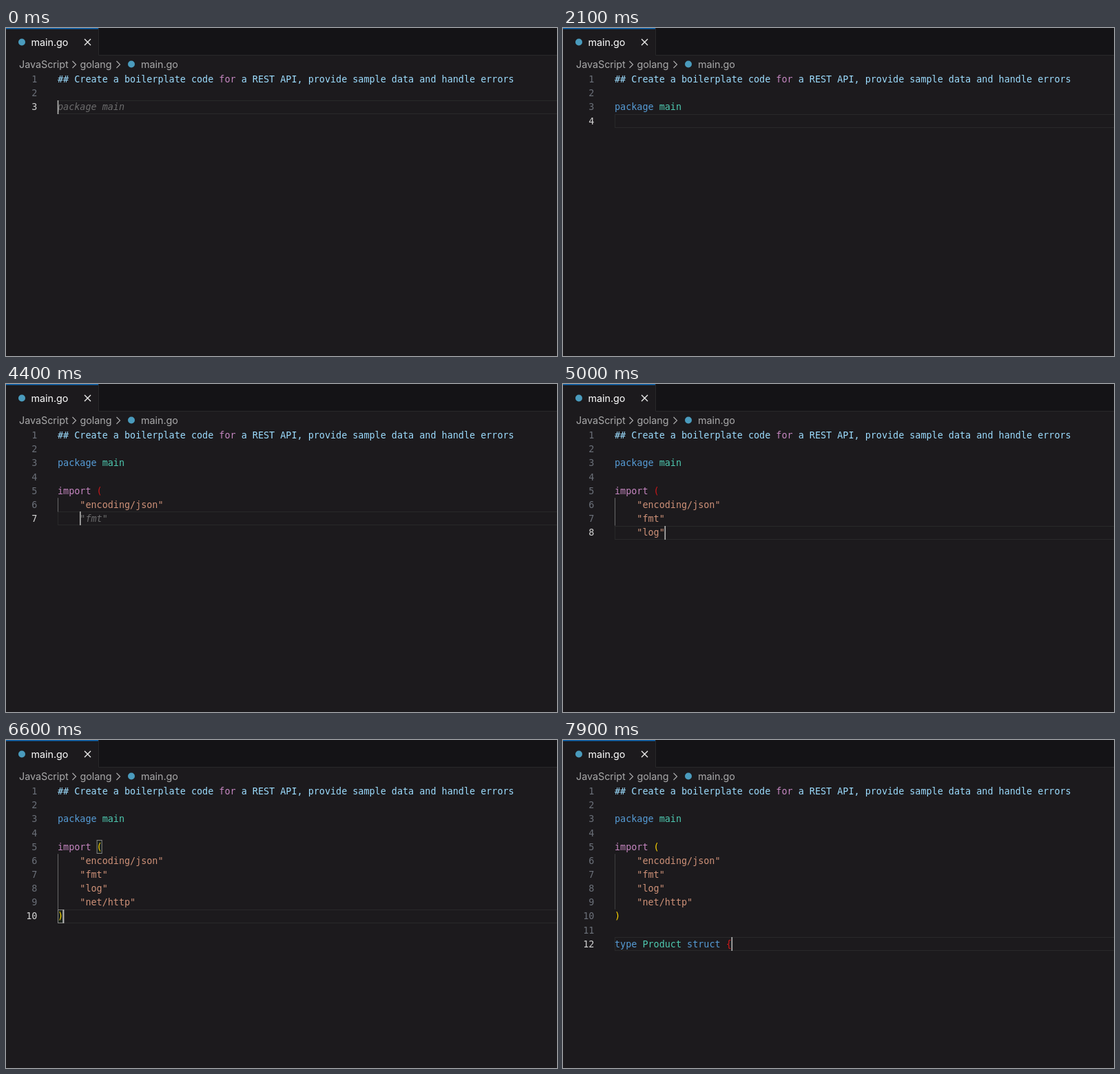
An HTML page that plays this animation: 800 by 476 pixels, repeating every 8000 ms.

```html
<!DOCTYPE html>
<html lang="en">
<head>
<meta charset="utf-8">
<title>Code editor</title>
<style>
  html, body { margin: 0; width: 100%; height: 100%; overflow: hidden; background: #1c1a1d; }
  svg { display: block; width: 100vw; height: 100vh; }
  text { white-space: pre; }
  .ui { font: 14.3px Inter, sans-serif; fill: #a9a9aa; }
  .ui .title { fill: #fff; }
  .stroke { fill: none; stroke: #a9a9aa; stroke-width: 1.2; }
  #code { font: 13.43px "DejaVu Sans Mono", monospace; }
  .number { fill: #6b7079; text-anchor: end; }
  .number.active { fill: #d4d4d4; }
  .name { fill: #9cdcfe; }
  .control { fill: #c586c0; }
  .keyword { fill: #569cd6; }
  .type { fill: #4ec9b0; }
  .string { fill: #ce9178; }
  .bracket { fill: #ffd700; }
  .unmatched { fill: #d01719; }
  .ghost { fill: #6b6b6c; font-style: italic; }
  .cursor { fill: #b5b5b4; }
  .current { fill: none; stroke: #29292a; }
  .pair { fill: #1b221c; stroke: #858585; }
</style>
</head>
<body>
<svg viewBox="0 0 800 476">
  <rect width="800" height="476" fill="#1c1a1d"/>
  <rect x="134" width="666" height="39.5" fill="#141316"/>
  <path d="M134.5 0V39.5H800" fill="none" stroke="#29282a"/>
  <rect width="134" height="1.5" fill="#0e68b5"/>
  <g fill="#4a9bbd"><circle cx="23" cy="20.5" r="5"/><circle cx="182" cy="52.5" r="5"/></g>
  <path class="stroke" style="stroke:#eee;stroke-width:1.4" d="M114 16l9 9m0-9l-9 9"/>
  <path class="stroke" d="M96.5 48l5 5-5 5M160.5 48l5 5-5 5"/>
  <g class="ui">
    <text class="title" x="36.5" y="25.5">main.go</text>
    <text x="19" y="57.5">JavaScript</text>
    <text x="107.5" y="57.5">golang</text>
    <text x="196" y="57.5">main.go</text>
  </g>
  <g id="code"></g>
</svg>
<script>
const LOOP = 8000, BLINK = 500;
const LEFT = 75, TOP = 64.6, CHAR = 8.085, ROW = 20.14;
const OPEN_ROW = 5, CLOSE_ROW = 10, STRUCT_ROW = 12;

// Each row is a list of [style, text] tokens.
const rows = [
  [['name', '## Create a boilerplate code '], ['control', 'for'],
   ['name', ' a REST API, provide sample data and handle errors']],
  [],
  [['keyword', 'package '], ['type', 'main']],
  [],
  [['control', 'import '], ['bracket', '(']],
  [['string', '    "encoding/json"']],
  [['string', '    "fmt"']],
  [['string', '    "log"']],
  [['string', '    "net/http"']],
  [['bracket', ')']],
  [],
  [['keyword', 'type '], ['type', 'Product '], ['keyword', 'struct '], ['bracket', '{']]
];

// [time, current row, what that row holds]
const steps = [
  [-200, 3, 'ghost'], [300, 3, 'done'], [1400, 4, 'empty'],
  [2900, 5, 'empty'], [3100, 5, 'ghost'], [3400, 5, 'done'],
  [3700, 6, 'empty'], [3800, 6, 'ghost'], [4000, 6, 'done'],
  [4200, 7, 'empty'], [4300, 7, 'ghost'], [4500, 7, 'done'],
  [4700, 8, 'empty'], [4800, 8, 'ghost'], [4900, 8, 'done'],
  [5100, 9, 'empty'], [5200, 9, 'ghost'], [5300, 9, 'done'],
  [5400, 10, 'empty'], [5500, 10, 'ghost'], [6200, 10, 'done'],
  [6800, 11, 'empty'],
  [7400, 12, 'empty'], [7500, 12, 'ghost'], [7700, 12, 'done']
];

const codeLayer = document.getElementById('code');
const rowTop = row => TOP + (row - 1) * ROW;
const columnX = column => LEFT + column * CHAR;
const plain = row => rows[row - 1].map(token => token[1]).join('');
const rect = (style, x, y, w, h) =>
  `<rect class="${style}" x="${x}" y="${y}" width="${w}" height="${h}"/>`;
const label = (style, x, row, content) =>
  `<text class="${style}" x="${x}" y="${rowTop(row) + 14.6}">${content}</text>`;
const pairBox = (column, row) =>
  rect('pair', columnX(column) + 0.5, Math.round(rowTop(row)) + 0.5, CHAR - 1, 19);

function drawCode(current, state, cursorOn) {
  const closed = current > CLOSE_ROW || (current === CLOSE_ROW && state === 'done');
  const indent = current > OPEN_ROW && current <= CLOSE_ROW ? 4 : 0;
  const y = Math.round(rowTop(current));
  let out = rect('current', LEFT + 0.5, y + 0.5, 800, 19);

  const guideEnd = Math.min(current, CLOSE_ROW);
  if (guideEnd > OPEN_ROW + 1) {
    const start = rowTop(OPEN_ROW + 1);
    out += `<rect x="${LEFT}" y="${start}" width="1" height="${rowTop(guideEnd) - start}"
      fill="${current > CLOSE_ROW ? '#3d3d3e' : '#69696a'}"/>`;
  }
  if (current === CLOSE_ROW && closed) out += pairBox(7, OPEN_ROW) + pairBox(0, CLOSE_ROW);

  for (let row = 1; row <= current; row++) {
    out += label(row === current ? 'number active' : 'number', 45.3, row, row);
    if (row === current && state !== 'done') continue;
    const unmatched = row === STRUCT_ROW || (row === OPEN_ROW && !closed);
    const spans = rows[row - 1].map(([style, text]) =>
      `<tspan class="${style === 'bracket' && unmatched ? 'unmatched' : style}">${text}</tspan>`);
    out += label('line', LEFT, row, spans.join(''));
  }
  if (state === 'ghost') out += label('ghost', columnX(indent), current, plain(current).trim());
  if (cursorOn) {
    const column = state === 'done' ? plain(current).length : indent;
    out += rect('cursor', columnX(column) - 0.3, y, 1.6, 20);
  }
  codeLayer.innerHTML = out;
}

let shown = '';
function frame(now) {
  const time = now % LOOP;
  const past = steps.filter(step => step[0] <= time);
  const [, row, state] = past.at(-1);
  // The blink restarts at each key press; a suggestion appearing leaves it alone.
  const keyTime = (past.findLast(step => step[2] !== 'ghost') || past[0])[0];
  const cursorOn = Math.floor((time - keyTime) / BLINK) % 2 === 0;
  const key = `${row} ${state} ${cursorOn}`;
  if (key !== shown) drawCode(row, state, cursorOn);
  shown = key;
  requestAnimationFrame(frame);
}
requestAnimationFrame(frame);
</script>
</body>
</html>
```
